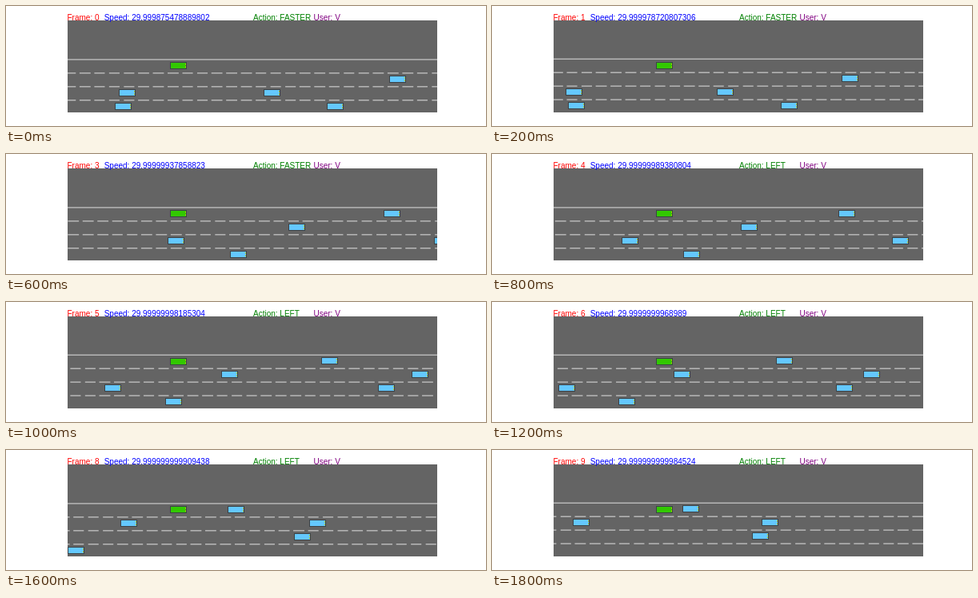
Animation of 600x150 px, one loop 2000 ms. Source, as an HTML page with a canvas:

```html
<!DOCTYPE html>
<html lang="en">
<head>
<meta charset="utf-8">
<title>Highway</title>
<style>
html, body { margin: 0; width: 100%; height: 100%; overflow: hidden; background: #fff; }
body { position: relative; }
canvas { position: absolute; left: 0; top: 0; width: 600px; height: 150px; }
span {
  position: absolute; top: 9px;
  font: 10px/11px "Liberation Sans", Arial, sans-serif;
  white-space: pre;
}
#frame { left: 76.5px; color: #f00; }
#speed { left: 122.7px; color: #00f; }
#action { left: 309px; color: #008000; }
#user { left: 384.5px; color: #800080; }
</style>
</head>
<body>
<canvas id="road" width="600" height="150"></canvas>
<span id="frame"></span><span id="speed"></span><span id="action"></span><span id="user">User: V</span>
<script>
const STEP = 200, STEPS = 10;
const ROAD = { x: 77, y: 18, w: 462, h: 115 };
const SCALE = 0.77, LANE = 16.94;
const STRIPE = 4.33 * 5.5, DASH = 3 * 5.5, DRIFT = 7 * STRIPE - 30 * 5.5;
const SPEEDS = [
  '29.999875478889802', '29.999978720807306', '29.99999636363637', '29.99999937858823',
  '29.99999989380804', '29.99999998185304', '29.9999999968989', '29.99999999947006',
  '29.999999999909438', '29.999999999984524'
];
// lane, centre x at step 0, shift per step, initial lag that settles
const CARS = [
  [1, 489, -41.9, 0],
  [2, 331.1, -39.6, 1.4],
  [2, 151.5, -49, 0],
  [3, 146.5, -41, 0],
  [3, 411.5, -40.5, 0],
  [0, 599, -38.9, 0],
  [2, 649.7, -34.9, 0],
  [1, 729.5, -42.5, 0]
];

const $ = id => document.getElementById(id);
const ctx = $('road').getContext('2d');

function rect(color, x, y, w, h) {
  ctx.fillStyle = color;
  ctx.fillRect(x, y, w, h);
}

function car(x, y, color) {
  const l = Math.round(x - 10.5), t = Math.round(y - 4.5);
  rect('#3c4246', l, t, 21, 9);
  rect(color, l + 1, t + 1, 19, 7);
  rect('#c8c800', l + 19, t + 2, 1, 1.5);
  rect('#c8c800', l + 19, t + 5.5, 1, 1.5);
}

function draw(n) {
  const low = ((n + 1) & 2) === 0;
  const top = low ? 66.3 : 65.6;
  ctx.clearRect(0, 0, 600, 150);
  ctx.save();
  ctx.beginPath();
  ctx.rect(ROAD.x, ROAD.y, ROAD.w, ROAD.h);
  ctx.clip();
  rect('#646464', ROAD.x, ROAD.y, ROAD.w, ROAD.h);

  rect('#c4c4c4', ROAD.x, top, ROAD.w, 1.3);
  for (let s = -3.2 + n * DRIFT - STRIPE; s < 600; s += STRIPE) {
    const a = Math.floor(s), b = Math.floor(s + DASH) + 1;
    for (let i = 1; i < 4; i++) {
      rect('#c4c4c4', 76.5 + a * SCALE, top + i * LANE, (b - a) * SCALE, 1.3);
    }
  }

  for (const [lane, x, v, lag] of CARS) {
    car(x + v * n + lag * 0.17 ** n, (low ? 74.5 : 73.5) + lane * 17, '#64c8ff');
  }
  car(215.5, 74.5, '#32c800');
  ctx.restore();

  $('frame').textContent = 'Frame: ' + n;
  $('speed').textContent = 'Speed: ' + SPEEDS[n];
  $('action').textContent = 'Action: ' + (n < 4 ? 'FASTER' : 'LEFT');
}

let shown = -1;
function tick() {
  const n = Math.floor(performance.now() / STEP) % STEPS;
  if (n !== shown) draw(shown = n);
  requestAnimationFrame(tick);
}
tick();
</script>
</body>
</html>
```
